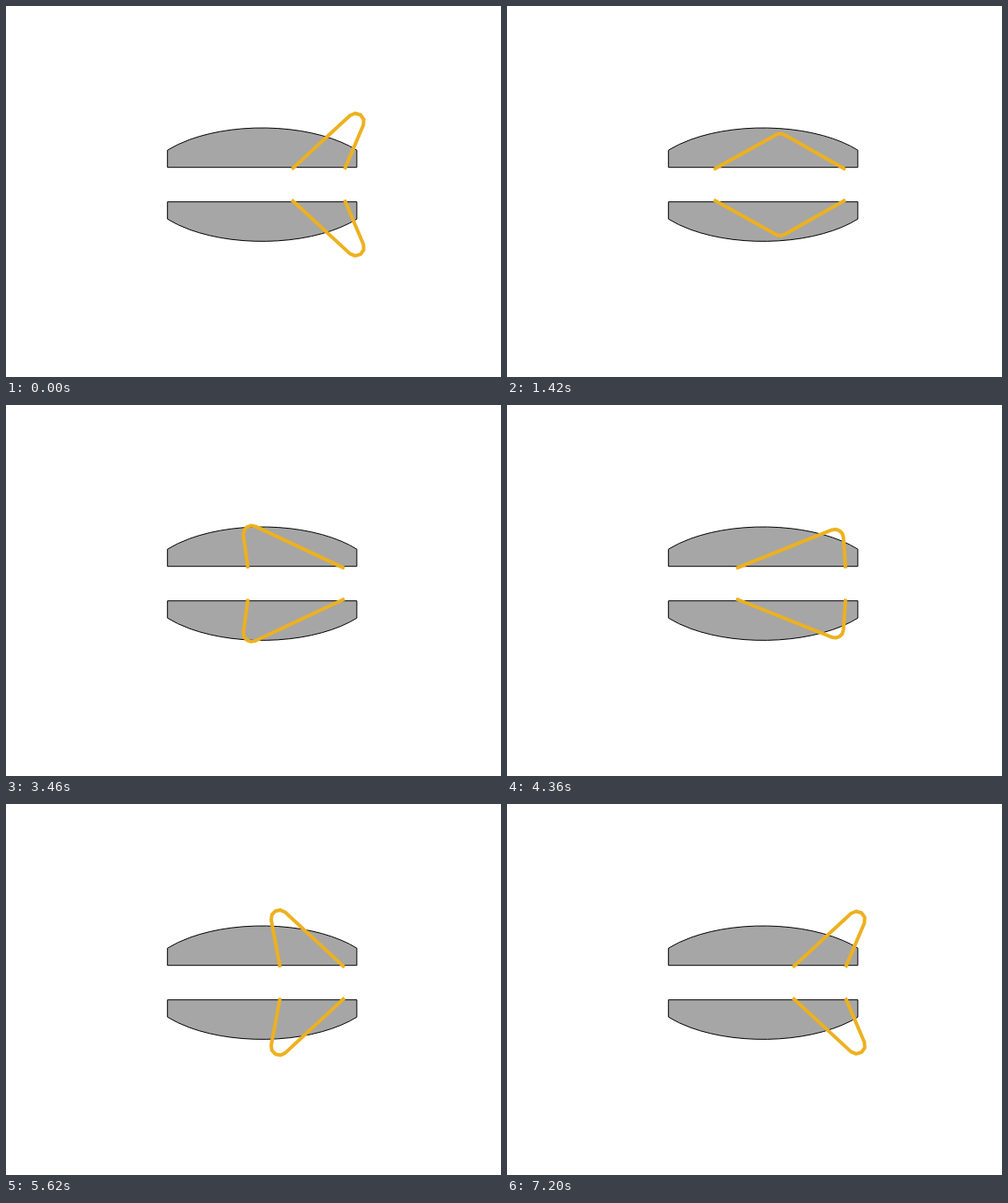
Write an HTML page with a canvas that moves like this. It is 560 by 420 pixels and loops after 7.22 s.

```html
<!DOCTYPE html>
<html lang="en">
<head>
<meta charset="utf-8">
<title>Tape gripper</title>
<style>
html, body { margin: 0; width: 100%; height: 100%; overflow: hidden; background: #fff; }
canvas { display: block; }
</style>
</head>
<body>
<canvas id="stage" width="560" height="420"></canvas>
<script>
const ctx = document.getElementById('stage').getContext('2d');
const { PI, sin, cos, asin, atan2, sqrt, hypot, floor } = Math;
const STEP = 20, STEPS = 361, RAD = PI / 180;
const CENTER = { x: 289.8, y: 202.2 };    // the two halves mirror each other about y
const BODY = { half: 107.1, inner: 19.5, shoulder: 39, peak: 64.2 };
const BASE = { x: 383, y: 17.3 };         // fixed end of the tape, y measured from the mirror line
const LENGTH = 170, BEND = 9.5, CHORDS = 4;

// Tape of constant length: straight leg, round bend, straight leg down to the sliding foot.
function bendAt(leg, gap, lean) {
  const x = leg * cos(lean) - BEND * sin(lean);
  const y = leg * sin(lean) + BEND * cos(lean);
  const reach = hypot(x + gap, y);
  const slope = atan2(y, x + gap) + asin(BEND / reach);
  const turn = slope + PI - lean;
  const total = leg + BEND * turn + sqrt(reach * reach - BEND * BEND);
  return { x, y, turn, total };
}

function tapePoints(theta) {
  const gap = 94.2 - 58.9 * cos(theta - 54.2 * RAD);
  const lean = (112.4 - 45.4 * cos(theta)) * RAD;
  let low = 0, high = LENGTH;
  for (let i = 0; i < 30; i++) {
    const mid = (low + high) / 2;
    if (bendAt(mid, gap, lean).total < LENGTH) low = mid; else high = mid;
  }
  const bend = bendAt(low, gap, lean);
  const points = [[0, 0]];
  for (let i = 0; i <= CHORDS; i++) {
    const a = lean - PI / 2 + bend.turn * i / CHORDS;
    points.push([bend.x + BEND * cos(a), bend.y + BEND * sin(a)]);
  }
  points.push([-gap, 0]);
  return points;
}

// The curved back is part of an ellipse centred on the mirror line.
function drawBody() {
  const { half, inner, shoulder, peak } = BODY;
  const start = asin(shoulder / peak);
  ctx.beginPath();
  ctx.moveTo(CENTER.x + half, inner);
  ctx.ellipse(CENTER.x, 0, half / cos(start), peak, 0, start, PI - start);
  ctx.lineTo(CENTER.x - half, inner);
  ctx.closePath();
  ctx.fillStyle = '#a6a6a6';
  ctx.fill();
  ctx.strokeStyle = '#000';
  ctx.lineWidth = 1;
  ctx.stroke();
}

function drawTape(points) {
  ctx.beginPath();
  for (const [x, y] of points) ctx.lineTo(BASE.x + x, BASE.y + y);
  ctx.strokeStyle = '#edb120';
  ctx.lineWidth = 4;
  ctx.lineJoin = 'round';
  ctx.stroke();
}

function draw(ms) {
  const step = floor(ms / STEP) % STEPS;
  const points = tapePoints(step * 3 * RAD);
  ctx.setTransform(1, 0, 0, 1, 0, 0);
  ctx.fillStyle = '#fff';
  ctx.fillRect(0, 0, 560, 420);
  for (const side of [-1, 1]) {
    ctx.setTransform(1, 0, 0, side, 0, CENTER.y);
    drawBody();
    drawTape(points);
  }
}

let start;
function tick(now) {
  start ??= now;
  draw(now - start);
  requestAnimationFrame(tick);
}
draw(0);
requestAnimationFrame(tick);
</script>
</body>
</html>
```
